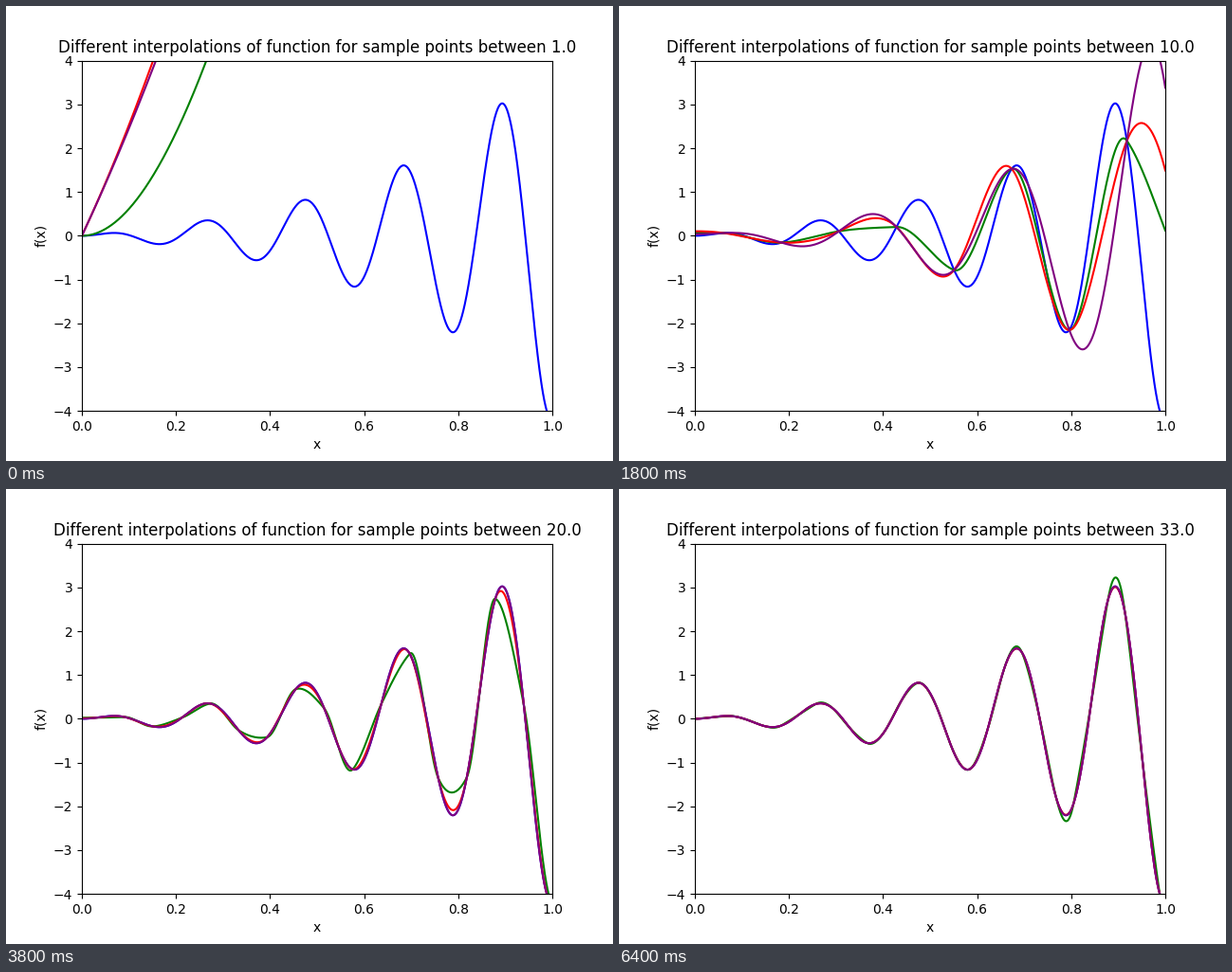
Animation, 640 px wide and 480 px high, one loop 6600 ms. Source, as a matplotlib script:

```python
import numpy as np
import matplotlib.pyplot as plt
from matplotlib.animation import FuncAnimation

REACH = 3.0        # samples cover [-REACH, REACH]
PER_STEP = 5       # samples added with every frame
FRAMES = 33
INTERVAL = 200


def f(x):
    return np.tan(x) * np.exp(x) * np.sin(30 * x)


def locate(xs, x):
    """Index of the sample interval holding each x."""
    return np.clip(np.searchsorted(xs, x, side="right") - 1, 0, len(xs) - 2)


def hermite(xs, ys, slopes, x):
    i = locate(xs, x)
    h = xs[i + 1] - xs[i]
    t = (x - xs[i]) / h
    rise = 3 * t**2 - 2 * t**3
    return (ys[i] * (1 - rise) + ys[i + 1] * rise
            + h * slopes[i] * t * (1 - t)**2
            - h * slopes[i + 1] * t**2 * (1 - t))


def akima(xs, ys, x):
    m = np.diff(ys) / np.diff(xs)
    m = np.concatenate([[3 * m[0] - 2 * m[1], 2 * m[0] - m[1]], m,
                        [2 * m[-1] - m[-2], 3 * m[-1] - 2 * m[-2]]])
    dm = np.abs(np.diff(m))
    left, right = dm[2:], dm[:-2]
    total = left + right
    slopes = (m[3:] + m[:-3]) / 2
    ok = total > 1e-9 * total.max()
    slopes[ok] = (left * m[1:-2] + right * m[2:-1])[ok] / total[ok]
    return hermite(xs, ys, slopes, x)


def cubic_spline(xs, ys, x):
    """Not-a-knot cubic spline on evenly spaced samples."""
    n = len(xs)
    h = xs[1] - xs[0]
    a = 4 * np.eye(n) + np.eye(n, k=1) + np.eye(n, k=-1)
    rhs = np.zeros(n)
    rhs[1:-1] = 6 * np.diff(ys, 2) / h**2
    a[0], a[-1] = 0, 0
    a[0, :3] = a[-1, -3:] = 1, -2, 1
    bend = np.linalg.solve(a, rhs)

    i = locate(xs, x)
    t = (x - xs[i]) / h
    s = 1 - t
    return (s * ys[i] + t * ys[i + 1]
            + h**2 / 6 * ((s**3 - s) * bend[i] + (t**3 - t) * bend[i + 1]))


def polynomial(xs, ys, x):
    """Barycentric form of the polynomial through all samples."""
    n = len(xs)
    k = np.arange(1, n)
    weights = np.concatenate([[1.0], np.cumprod(-(n - k) / k)])
    weights /= np.abs(weights).max()
    gap = x[:, None] - xs
    hit = np.abs(gap) < 1e-12
    q = weights / np.where(hit, 1, gap)
    y = q @ ys / q.sum(axis=1)
    row, col = np.nonzero(hit)
    y[row] = ys[col]
    return y


fig, ax = plt.subplots(figsize=(6.4, 4.8), dpi=100)
ax.set_xlim(0, 1)
ax.set_ylim(-4, 4)
ax.set_xlabel("x")
ax.set_ylabel("f(x)")
title = ax.set_title("")

grid = np.linspace(0, 1, 1000)
ax.plot(grid, f(grid), color="blue")
curves = [(method, ax.plot([], [], color=color)[0])
          for method, color in ((akima, "green"),
                                (cubic_spline, "red"),
                                (polynomial, "purple"))]


def update(frame):
    step = frame + 1
    xs = np.linspace(-REACH, REACH, PER_STEP * step)
    ys = f(xs)
    for method, line in curves:
        line.set_data(grid, method(xs, ys, grid))
    title.set_text("Different interpolations of function for sample points "
                   f"between {step:.1f}")
    return [title] + [line for _, line in curves]


anim = FuncAnimation(fig, update, frames=FRAMES, interval=INTERVAL,
                     repeat=True, repeat_delay=0)
plt.show()
```
